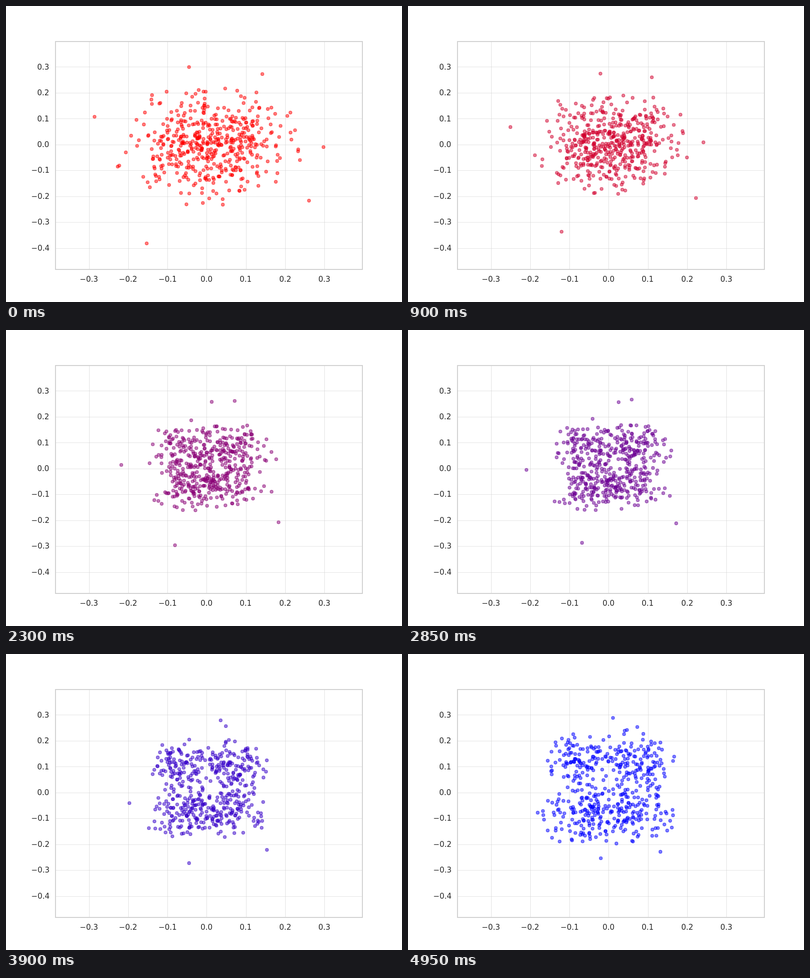
An HTML page with a canvas that plays this animation: 800 px wide and 600 px high, repeating every 5 s.

```html
<!DOCTYPE html>
<html lang="en">
<head>
<meta charset="utf-8">
<title>Scatter morph</title>
<style>
  html, body { margin: 0; width: 100%; height: 100%; overflow: hidden; background: #fff; }
  canvas { display: block; }
</style>
</head>
<body>
<canvas id="stage" width="800" height="600"></canvas>
<script>
const ctx = document.getElementById('stage').getContext('2d');
const STEPS = 100, STEP_MS = 50, COUNT = 500;
const toX = v => 405.4 + v * 792;
const toY = v => 280.7 - v * 524.8;

let seed = 20417;
function random() {
  seed = (seed * 1664525 + 1013904223) % 4294967296;
  return (seed + 0.5) / 4294967296;
}

function gauss() {
  return Math.sqrt(-2 * Math.log(random())) * Math.cos(2 * Math.PI * random());
}

function gaussPair(limit) {
  let a, b;
  do { a = gauss(); b = gauss(); } while (Math.hypot(a, b) > limit);
  return [a, b];
}

// One round cloud parts into four soft groups; a point tends to stay on its own side.
function randomPoint() {
  const [a, b] = gaussPair(2.5);
  const [c, d] = gaussPair(2.2);
  const right = a + 1.2 * gauss() > 0;
  const upper = b + 1.2 * gauss() > 0.13;
  return {
    from: [a * 0.1, b * 0.095],
    to: [(right ? 0.062 : -0.062) + c * 0.055, (upper ? 0.118 : -0.085) + d * 0.057]
  };
}

// The farthest outliers carry the outline of the cloud.
const points = [
  { from: [-0.153, -0.382], to: [-0.02, -0.254] },
  { from: [0.261, -0.217], to: [0.132, -0.229] },
  { from: [0.298, -0.01], to: [0.082, 0.087] },
  { from: [-0.286, 0.107], to: [-0.181, -0.078] },
  { from: [-0.045, 0.299], to: [0.073, 0.253] },
  { from: [0.142, 0.272], to: [0.011, 0.288] }
];
while (points.length < COUNT) points.push(randomPoint());

function line(x0, y0, x1, y1) {
  ctx.beginPath();
  ctx.moveTo(x0, y0);
  ctx.lineTo(x1, y1);
  ctx.stroke();
}

// Places the inked part of the text: anchor 0.5 centres it on x, 1 ends it there.
function drawLabel(n, x, baseline, anchor) {
  const text = (n < 0 ? '\u2212' : '') + (Math.abs(n) / 10).toFixed(1);
  const box = ctx.measureText(text);
  const left = -box.actualBoundingBoxLeft, right = box.actualBoundingBoxRight;
  ctx.fillText(text, Math.round(x - left - (right - left) * anchor), baseline);
}

function drawAxes() {
  ctx.fillStyle = '#fff';
  ctx.fillRect(0, 0, 800, 600);
  ctx.font = '15.28px "DejaVu Sans", sans-serif';
  ctx.fillStyle = '#262626';
  ctx.strokeStyle = 'rgba(204,204,204,0.5)';
  ctx.lineWidth = 1.1;
  for (let n = -3; n <= 3; n++) {
    const x = toX(n / 10), gridX = Math.round(x) + 0.5;
    line(gridX, 72, gridX, 534);
    drawLabel(n, x, 559, 0.5);
  }
  for (let n = -4; n <= 3; n++) {
    const y = toY(n / 10), gridY = Math.round(y) + 0.5;
    line(100, gridY, 720, gridY);
    drawLabel(n, 87, Math.round(y + 5.3), 1);
  }
}

function drawPoints(s) {
  const red = Math.round(255 * (1 - s));
  // The cloud tightens early on while each point heads for its end.
  const start = 1 - s - 0.45 * s * Math.pow(1 - s, 1.8);
  const blend = (a, b) => a * start + b * s;
  ctx.fillStyle = ctx.strokeStyle = `rgba(${red},0,${255 - red},0.5)`;
  ctx.lineWidth = 1.39;
  for (const { from, to } of points) {
    ctx.beginPath();
    ctx.arc(toX(blend(from[0], to[0])), toY(blend(from[1], to[1])), 3.1, 0, 2 * Math.PI);
    ctx.fill();
    ctx.stroke();
  }
}

function frame() {
  const step = Math.floor(performance.now() / STEP_MS) % STEPS;
  drawAxes();
  drawPoints(step / (STEPS - 1));
  ctx.strokeStyle = '#ccc';
  ctx.lineWidth = 1.75;
  ctx.strokeRect(100, 72, 620, 462);
  requestAnimationFrame(frame);
}
frame();
</script>
</body>
</html>
```
